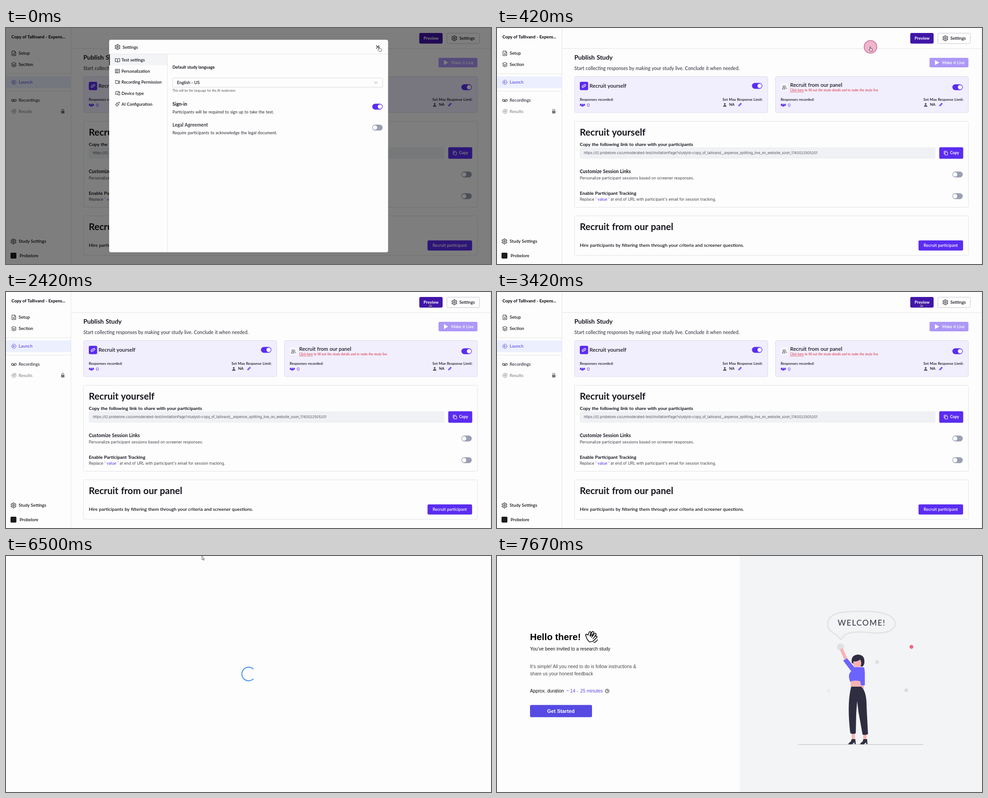
These frames come from a looping animation (1072x522 px, 8 s). An HTML page:

```html
<!DOCTYPE html>
<html lang="en">
<head>
<meta charset="utf-8">
<title>Study launch</title>
<style>
html, body { margin: 0; width: 100%; height: 100%; overflow: hidden; background: #fdfdfd; }
svg { display: block; width: 100%; height: 100%; }
text { font-family: Lato, sans-serif; word-spacing: .04em; white-space: pre; }
.inter { font-family: Inter, sans-serif; word-spacing: 0; }
.arial { font-family: "Liberation Sans", Arial, sans-serif; word-spacing: 0; }
.line { fill: none; stroke: #2a2a33; stroke-width: 1; stroke-linecap: round; stroke-linejoin: round; }
</style>
</head>
<body>
<svg id="stage" viewBox="0 0 1072 522" preserveAspectRatio="none"></svg>
<script>
const INK = '#15151d', VIOLET = '#5b2cf0', DIM = '#8d8d95', SKIN = '#f6b3b5', DARK = '#2f2e41';

// y is the middle of the capitals
const text = (x, y, s, size, weight = 400, fill = INK, attrs = '') =>
  `<text x="${x}" y="${y + size * .36}" font-size="${size}" font-weight="${weight}" fill="${fill}" ${attrs}>${s}</text>`;
const box = (x, y, w, h, fill, stroke = 'none', r = 3) =>
  `<rect x="${x}" y="${y}" width="${w}" height="${h}" rx="${r}" fill="${fill}" stroke="${stroke}"/>`;
const dot = (x, y, r, fill) => `<circle cx="${x}" cy="${y}" r="${r}" fill="${fill}"/>`;
const shape = (d, fill) => `<path d="${d}" fill="${fill}"/>`;
const icon = (x, y, d, color = '#2a2a33', width = 1, fill = 'none') =>
  `<path class="line" transform="translate(${x} ${y})" d="${d}" style="stroke:${color};stroke-width:${width};fill:${fill}"/>`;
const ring = (r, x = 0, y = 0) => `M${x - r} ${y}a${r} ${r} 0 1 0 ${2 * r} 0a${r} ${r} 0 1 0 ${-2 * r} 0`;

const toggle = (x, y, on) =>
  box(x - 11.5, y - 6.5, 23, 13, on ? VIOLET : '#9aa0b3', 'none', 6.5) + dot(x + (on ? 5.5 : -5.5), y, 4.8, '#fff');

function gear(x, y) {
  const pts = Array.from({ length: 24 }, (_, i) => {
    const a = (i - .5) * Math.PI / 12, r = i % 4 < 2 ? 5.8 : 4.4;
    return (r * Math.sin(a)).toFixed(2) + ' ' + (-r * Math.cos(a)).toFixed(2);
  });
  return icon(x, y, 'M' + pts.join('L') + 'Z' + ring(1.9), INK, 1.1);
}

const person = (x, y, s, fill) => dot(x, y - 2 * s, 1.9 * s, fill) +
  shape(`M${x - 3.7 * s} ${y + 4 * s}q0 -3.6 ${3.7 * s} -3.6t${3.7 * s} 3.6z`, fill);

const stats = x =>
  text(x, 158.5, 'Responses recorded:', 8.15, 600) +
  person(x + 2, 169.5, .55, VIOLET) + person(x + 9.6, 169.5, .55, VIOLET) + person(x + 5.8, 170.5, .75, VIOLET) +
  text(x + 16, 170, '0', 10, 400, VIOLET) +
  text(x + 315.5, 158.2, 'Set Max Response Limit:', 8.1, 600) +
  person(x + 320.5, 170, 1, '#50505c') + text(x + 330, 169.5, 'NA', 8.3, 600) +
  icon(x + 354, 169.5, 'M-3 3l.5 -2L2 -3.2l1.2 1.2L-1 2.5z', VIOLET, 1.2);

const nav = (x, y, s, fill = INK) => text(x, y, s, 9.6, 600, fill);

const sidebar =
  `<path d="M143.5 0V522M0 101H143M0 139.5H143M143 45.5H1071M1070.5 0V522" stroke="#e4e4e9" fill="none"/>` +
  text(12, 19.5, 'Copy of Tallivand - Expens...', 9.5, 800) +
  icon(17.5, 56, 'M-4 -5H1.5L4 -2.5V5H-4ZM1.5 -5V-2.5H4M-2 0H2M-2 2.5H2') + nav(28, 56, 'Setup') +
  icon(17.5, 81, 'M0 -5L5 -2.3L0 .3L-5 -2.3ZM-5 .3L0 2.8L5 .3M-5 2.6L0 5.2L5 2.6') + nav(28, 81, 'Section') +
  box(0, 107, 143, 26, '#eceffe', 'none', 0) +
  icon(17.5, 120, ring(4.7) + 'M-1.2 -2L2 0L-1.2 2Z', '#6b52dc') + nav(28, 120, 'Launch', '#6b52dc') +
  icon(17.5, 160, ring(2.3, -3) + ring(2.3, 3) + 'M-3 2.3H3', '#2a2a33', 1.1) + nav(28, 159.5, 'Recordings', '#3a3a44') +
  icon(17.5, 184.5, ring(4.7) + ring(2) + 'M0 0L4.5 -4.5', DIM) + nav(28, 184.5, 'Results', DIM) +
  box(121.8, 183, 7.4, 6, '#77777f', 'none', 1) + icon(125.5, 183, 'M-2.2 0V-1.2a2.2 2.2 0 0 1 4.4 0V0', '#77777f', 1.1) +
  gear(16.5, 472) + nav(28, 472, 'Study Settings') +
  box(10, 497, 13, 13, '#1d1d1f', 'none', 2) + nav(30, 504, 'Probelore');

const page = sidebar +
  box(913.5, 11, 51.5, 23.5, '#4015a8') + text(923, 22.7, 'Preview', 9.2, 700, '#fff') +
  box(974.5, 11.5, 72, 23, '#fdfdfd', '#c8c8d0') + gear(991, 22.7) + text(1002, 22.7, 'Settings', 9.7, 600) +
  text(171, 65.3, 'Publish Study', 13.9, 700) +
  text(171, 89.3, 'Start collecting responses by making your study live. Conclude it when needed.', 10.45, 500, '#3a3a44') +
  box(956, 66, 86, 21, '#ad97f7') + shape('M968 71v11l9.5 -5.5z', '#fff') + text(984, 76.7, 'Make it Live', 9.1, 600, '#fff') +
  box(171.5, 107.5, 427, 79.5, '#f1eefe', '#dcd8ea') + box(615.5, 107.5, 426.5, 79.5, '#f1eefe', '#dcd8ea') +
  box(183, 119, 18.5, 18.5, VIOLET) +
  icon(192.2, 128.2, 'M-1 2.2L-2.4 3.6A2 2 0 0 1 -4 .8L-1.7 -1.5A2 2 0 0 1 1 -1.3M1 -2.2L2.4 -3.6A2 2 0 0 1 4 -.8L1.7 1.5A2 2 0 0 1 -1 1.3', '#fff', 1.2) +
  text(204.5, 128.3, 'Recruit yourself', 11.65, 600) + toggle(575, 128, true) + stats(183) +
  box(627, 122, 17, 17, '#f8f7fb') +
  icon(635.5, 131, ring(2, -1.7, -1.5) + 'M-5 3.8q.3 -3 3.3 -3t3.3 3zM1.5 -3.4a2 2 0 0 1 0 3.8M3 1q2 .5 2 2.8', '#4b4b55') +
  text(648, 126.3, 'Recruit from our panel', 11.5, 600) +
  text(648, 138, '<tspan text-decoration="underline">Click here</tspan> to fill out the study details and to make the study live', 6.85, 500, '#dc3546') +
  toggle(1018, 131, true) + stats(627) +

  box(171.5, 206.5, 870.5, 190, '#fdfdfd', '#e2e2e7') +
  text(183, 230.3, 'Recruit yourself', 20.6, 700) +
  text(183, 257.2, 'Copy the following link to share with your participants', 10.3, 700) +
  box(183, 264, 786, 25, '#eff1f4') +
  text(192, 276, 'https://t2.probelore.co/unmoderated-test/invitationPage?studyId=copy_of_tallivand__expense_splitting_live_on_website_soon_1740022505201', 7.73, 400, '#555560', 'class="inter"') +
  box(977.5, 263.7, 53, 25.5, VIOLET) + icon(992, 276.5, 'M-1.5 -2H4V4.3H-1.5ZM-3.7 2V-4.2H1.8', '#fff') + text(1001.5, 276.3, 'Copy', 8.6, 700, '#fff') +
  text(183, 317.4, 'Customize Session Links', 10.35, 700) +
  text(183, 331.5, 'Personalize participant sessions based on screener responses.', 8.48, 400, '#44444e', 'class="inter"') +
  toggle(1018, 324, false) +
  text(183, 365.4, 'Enable Participant Tracking', 10.3, 700) +
  text(183, 379, `Replace <tspan fill="${VIOLET}">' value '</tspan> at end of URL with participant's email for session tracking.`, 8.48, 400, '#44444e', 'class="inter"') +
  toggle(1018, 372, false) +

  box(171.5, 415.5, 870.5, 87.5, '#fdfdfd', '#e2e2e7') +
  text(183, 439.5, 'Recruit from our panel', 20.5, 700) +
  text(183, 480.4, 'Hire participants by filtering them through your criteria and screener questions.', 10.3, 600) +
  box(931.7, 469.7, 98.5, 22.6, VIOLET) + text(943, 481, 'Recruit participant', 9.2, 600, '#fff');

const tab = (y, s, d) => icon(246.5, y, d) + text(255.3, y, s, 9.3, 600);

const modal = box(0, 0, 1072, 522, 'rgba(0,0,0,.5)', 'none', 0) +
  box(228, 26, 616.5, 470, '#fdfdfd', 'none', 4) +
  box(228, 58, 128, 24.5, '#f3f4f6', 'none', 0) + box(228, 58, 1.5, 24.5, '#111', 'none', 0) +
  `<path d="M228 57.5H844M356.5 57.5V496" stroke="#e4e4e9" fill="none"/>` +
  gear(246.5, 42) + text(257.5, 42.3, 'Settings', 9.7, 600) + icon(821.5, 42, 'M-3 -3L3 3M3 -3L-3 3', INK, 1.2) +
  tab(71, 'Test settings', 'M0 -2.5Q-2 -4 -5 -3.5V3.5Q-2 3 0 4.3Q2 3 5 3.5V-3.5Q2 -4 0 -2.5V4') +
  tab(95.3, 'Personalization', 'M-4.5 -4H4.5V4H-4.5Z' + ring(1.4, -1.3, -.8) + 'M-3.5 3q2.2 -2.6 4.4 0M2 -1.5H3M2 .8H3') +
  tab(119.7, 'Recording Permission', 'M-2 -3H2V3H-4.5V0M2 -1L5 -2.8V2.8L2 1M-5 -3H-3M-4 -4V-2') +
  tab(144.2, 'Device type', 'M-3.8 1.8V-3.8H4V-2M-5 2.5H.5M1.5 -1.5H5V4H1.5Z') +
  tab(168.6, 'AI Configuration', 'M-1 -3.5L.3 -.3L3.5 1L.3 2.3L-1 5L-2.3 2.3L-5 1L-2.3 -.3ZM3.3 -5V-2M1.8 -3.5H4.8') +
  text(368, 86.7, 'Default study language', 9.05, 700) +
  box(368.5, 110.5, 464, 20.5, '#fdfdfd', '#d8d8de') + text(378, 121, 'English - US', 9.3, 600) +
  icon(817.5, 121, 'M-3 -1.5L0 1.5L3 -1.5', '#777') +
  text(368, 138.3, 'This will be the language for the AI moderator.', 6.85, 400, '#55555f') +
  text(368, 168, 'Sign-in', 10.5, 700) + toggle(821, 174, true) +
  text(368, 186, 'Participants will be required to sign up to take the test.', 9.2, 500, '#3a3a44') +
  text(368, 214, 'Legal Agreement', 10.45, 700, '#3a3a44') + toggle(821, 220.3, false) +
  text(368, 232, 'Require participants to acknowledge the legal document.', 9.2, 500, '#3a3a44');

const arial = (x, y, s, size, weight, fill) => text(x, y, s, size, weight, fill, 'class="arial"');

// a wide dark stroke under a narrow light one leaves the outline
const palm = 'M-11 -4L-8 4L-4 9L2 8L10 0M-8 3L-3.5 -9.5M-4 2L2.8 -10M0 4L8 -6';
const wave = icon(209, 179, palm, '#111', 5.8, '#111') + icon(209, 179, palm, '#fdfdfd', 2.4, '#fdfdfd') +
  icon(209, 179, 'M-3 -1L0 -6M0 1L4 -4.5M3 4L7 0M5 12.5Q11 11 13 6', '#111', 1.6);

const woman =
  `<path d="M762 208L772 230" stroke="${SKIN}" stroke-width="7" stroke-linecap="round"/>` +
  shape('M765 231l9 -4.5L790 246H811Q813 250 813 262V286L803 287V278Q790 276 781 279Q774 262 783 255z', '#6c63ff') +
  shape('M782 277q11 -3 21 0l2 13h-23z', SKIN) +
  shape('M803 286l8 1 -1 18q-1 7 -5 6t-2 -7z', SKIN) +
  shape('M784 236Q782 219 798 218Q812 219 812 232Q813 241 807 245L790 240z', DARK) +
  shape('M788 233Q797 234 803 229Q808 241 801 246H791Q786 240 788 233z', SKIN) +
  shape('M784 393h7v14h-7zM809.5 394h7v13h-7z', SKIN) +
  shape('M783 289H805C815 298 817 315 817 335L820 394Q814 397 808 395L799 345L796 321L794 348L793 392Q787 395 781 392C777 360 775 318 783 289z', DARK) +
  shape('M784 405h8l1 11h-3v-4l-5 4.5h-9q2 -4 6 -6zM810 405h8l1 11h-3v-4l-5 4.5h-9q2 -4 6 -6z', DARK);

const welcome = box(0, 0, 536.5, 522, '#fdfdfd', 'none', 0) + box(536.5, 0, 535.5, 522, '#f3f4f6', 'none', 0) +
  '<g id="content">' +
  arial(73, 179, 'Hello there!', 20.4, 700, '#000') + wave +
  arial(73, 205.3, 'You’ve been invited to a research study', 10.2, 400, '#111') +
  arial(73, 244, 'It’s simple! All you need to do is follow instructions &amp;', 10.2, 400, '#4a4a4f') +
  arial(73, 260, 'share us your honest feedback', 10.2, 400, '#4a4a4f') +
  arial(73, 298.5, 'Approx. duration', 10.2, 400, '#111') +
  arial(153, 298.5, '~ 14 -', 10.2, 400, '#5a4be0') + arial(184, 298.5, '25 minutes', 10.2, 400, '#5a4be0') +
  icon(243.5, 298.5, ring(4) + 'M0 -2.3V.3H2', '#222', 1.1) +
  box(73, 329.5, 137, 27, '#564ae2') + arial(110.8, 343, 'Get Started', 11.3, 700, '#fff') +
  icon(0, 0, 'M760 185L751 175C738 169 731 160 731 150C732 129 752 123 795 122.5C850 121 880 130 880 150C879 166 857 172 832 170C806 167 782 167 769 174Z', '#e3e4e6', 3) +
  text(753, 148, 'WELCOME!', 17.5, 500, '#3f3d4c', 'letter-spacing="1.6"') +
  dot(759.5, 201.5, 8, '#e1e1e3') + dot(916, 201, 4.2, '#f2637f') +
  dot(840, 234.5, 4.2, '#dedfe1') + dot(904.5, 297, 4.2, '#dadbdd') + dot(733, 298, 3.8, '#eaebed') +
  icon(0, 0, 'M666 417H942', '#cbccd0', 1.6) + woman + '</g>';

document.getElementById('stage').innerHTML =
  box(0, 0, 1072, 522, '#fdfdfd', 'none', 0) +
  `<g id="page">${page}</g><g id="modal">${modal}</g><g id="welcome">${welcome}</g>` +
  `<g id="load"><path id="spin" d="M547 250.5A15 15 0 1 0 547 271.5" fill="none" stroke="#5a9ff0" stroke-width="2.4"/></g>` +
  `<circle id="click" cx="825.5" cy="41.8" r="14" fill="#efb6ce" stroke="#cf6491" stroke-width="1.5"/>` +
  `<g id="cursor" fill="#fff" stroke="#4a4654" stroke-width=".9" stroke-linejoin="round">` +
  `<path id="hand" fill-opacity=".3" d="M-.9 6V.9Q0 -.4 .9 .9V4.2L4.6 5Q5.3 5.3 5.2 6.5L4.4 10.6H-.4L-3.2 7.3Q-3 5.6 -.9 7Z"/>` +
  `<path id="arrow" d="M0 0V8.2L1.9 6.6L3.2 9.6L4.6 9L3.4 6.1H5.8Z"/></g>`;

const el = Object.fromEntries([...document.querySelectorAll('[id]')].map(e => [e.id, e]));
const show = (e, on) => e.setAttribute('display', on ? 'inline' : 'none');
const ramp = (t, a, b) => Math.min(1, Math.max(0, (t - a) / (b - a)));
const ease = p => p * p * (3 - 2 * p);

function draw(now) {
  const tick = Math.floor(now % 8000 * 12 / 1000), t = tick * 1000 / 12;
  const loading = t >= 6500 && t < 7160, done = t >= 7160;
  show(el.page, t < 6500);
  show(el.modal, t < 416);
  show(el.load, loading);
  show(el.welcome, done);
  el.content.setAttribute('opacity', .4 + .6 * ramp(t, 7160, 7500));
  el.spin.setAttribute('transform', `rotate(${(t - 6500) * .36} 536 261)`);

  show(el.click, t >= 416 && t < 750);
  el.click.setAttribute('opacity', 1 - ramp(t, 416, 750));

  const a = ease(ramp(t, 500, 1166)), b = ease(ramp(t, 4416, 5000));
  const x = 825 + 112 * a - 504 * b, y = 41 - 17 * a - 24 * b;
  const hand = a < .08 || (x > 914 && x < 965 && t < 6500);
  show(el.cursor, !done);
  show(el.hand, hand);
  show(el.arrow, !hand);
  el.cursor.setAttribute('transform', `translate(${x} ${y})`);
  requestAnimationFrame(draw);
}
requestAnimationFrame(draw);
</script>
</body>
</html>
```
